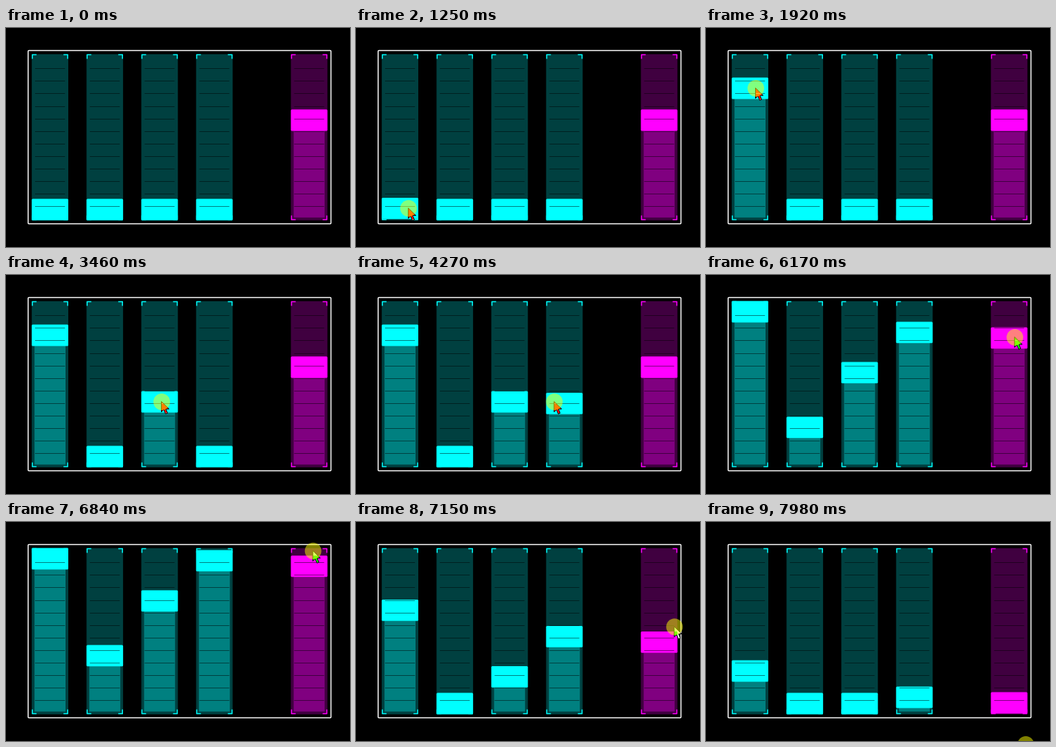
An HTML page with a canvas that plays this animation: 497x316 px, repeating every 8 s.

```html
<!DOCTYPE html>
<html lang="en">
<head>
<meta charset="utf-8">
<title>Linked sliders</title>
<style>
  html, body { margin: 0; width: 100%; height: 100%; overflow: hidden; background: #000; }
  canvas { display: block; width: 497px; height: 316px; }
</style>
</head>
<body>
<canvas id="stage" width="497" height="316"></canvas>
<script>
const ctx = document.getElementById('stage').getContext('2d');
const LOOP = 8000;
const TOP = 38, BOTTOM = 277, WIDTH = 52.8, THUMB = 30;
const MIN = TOP, MAX = BOTTOM - THUMB;
const MASTER_X = 411.6, MASTER_REST = 118;
const sliderX = i => 37.2 + 79.15 * i;

const CYAN = { track: '#004040', fill: '#008080', bright: '#00ffff' };
const MAGENTA = { track: '#400040', fill: '#800080', bright: '#ff00ff' };

const smooth = p => p * p * (3 - 2 * p);
const easeOut = power => p => 1 - (1 - p) ** power;
const lerp = (a, b, u) => a + (b - a) * u;
const limit = (v, low, high) => Math.min(high, Math.max(low, v));

// Pointer moves; "via" bends the path, "slider" and "master" mark drags
const MOVES = [
  { start: 190, end: 840, to: [76, 262], via: [240, 128] },
  { start: 1210, end: 1920, to: [72, 87], slider: 0, top: 72 },
  { start: 2120, end: 2920, to: [228, 253], via: [95, 275] },
  { start: 3090, end: 3460, to: [225, 183], slider: 2, top: 168 },
  { start: 3590, end: 3890, to: [281, 257] },
  { start: 3920, end: 4570, to: [291, 125], slider: 3, top: 110 },
  { start: 4740, end: 5480, to: [450, 132], via: [394, 254], ease: easeOut(2) },
  { start: 5800, end: 6640, to: [441, 30], master: -14 },
  { start: 6810, end: 7600, to: [462, 262], via: [468, 146], ease: easeOut(1.31), master: 7 },
  { start: 7630, end: 7840, to: [462, 321], ease: p => p, master: 7 }
];
MOVES.forEach((move, i) => { move.from = i ? MOVES[i - 1].to : [401, 330]; });

function progress(move, t) {
  const p = limit((t - move.start) / (move.end - move.start), 0, 1);
  return (move.ease || smooth)(p);
}

function position(move, t) {
  const u = progress(move, t);
  return move.from.map((a, axis) => {
    const b = move.to[axis];
    const c = move.via ? move.via[axis] : (a + b) / 2;
    return lerp(lerp(a, c, u), lerp(c, b, u), u);
  });
}

function sliderTop(i, t) {
  const move = MOVES.find(m => m.slider === i);
  return move ? lerp(MAX, move.top, progress(move, t)) : MAX;
}

function roundRect(x, y, w, h, color) {
  ctx.fillStyle = color;
  ctx.beginPath();
  ctx.roundRect(x, y, w, h, 1.5);
  ctx.fill();
}

function corner(x, y, dx, dy) {
  ctx.beginPath();
  ctx.moveTo(x, y + 6 * dy);
  ctx.lineTo(x, y);
  ctx.lineTo(x + 6 * dx, y);
  ctx.stroke();
}

function slider(x, top, colors) {
  const under = top + THUMB;
  roundRect(x, TOP - 0.3, WIDTH, BOTTOM - TOP + 0.8, colors.track);
  if (under < 273) {
    ctx.fillStyle = colors.fill;
    ctx.fillRect(x + 4, under, WIDTH - 8, 273.5 - under);
  }
  ctx.strokeStyle = colors.bright;
  ctx.lineWidth = 1.5;
  for (const [cx, dx] of [[x + 0.9, 1], [x + WIDTH - 0.9, -1]]) {
    corner(cx, TOP + 0.5, dx, 1);
    corner(cx, BOTTOM - 0.5, dx, -1);
  }
  roundRect(x, top - 0.4, WIDTH, THUMB + 0.8, colors.bright);
  ctx.fillStyle = 'rgba(0,0,0,.5)';
  for (let i = 0; i < 12; i++) {
    ctx.fillRect(x + 4.8, Math.round(58.22 + i * 18.1), WIDTH - 9.6, 1);
  }
}

const ARROW = new Path2D('M-.5 -.5V14.5L3 11.2L5.6 17.4L8.4 16.2L5.8 10.2H10.5Z');

// The arrow inverts what lies beneath it
function pointer([x, y], pressed) {
  ctx.save();
  ctx.translate(x, y);
  ctx.globalCompositeOperation = 'difference';
  ctx.fillStyle = '#fff';
  ctx.fill(ARROW);
  ctx.globalCompositeOperation = 'source-over';
  ctx.strokeStyle = '#000';
  ctx.lineWidth = 1;
  ctx.stroke(ARROW);
  if (pressed) {
    ctx.fillStyle = 'rgba(255,255,0,.5)';
    ctx.beginPath();
    ctx.arc(0, 0, 12, 0, Math.PI * 2);
    ctx.fill();
  }
  ctx.restore();
}

function draw(t) {
  const move = MOVES.findLast(m => t >= m.start) || MOVES[0];
  const tip = position(move, t);
  const master = 'master' in move ? limit(tip[1] + move.master, MIN, MAX - 1) : MASTER_REST;

  ctx.fillStyle = '#000';
  ctx.fillRect(0, 0, 497, 316);
  ctx.strokeStyle = '#fff';
  ctx.lineWidth = 1.5;
  ctx.beginPath();
  ctx.roundRect(32, 32.5, 437.5, 250, 1);
  ctx.stroke();

  for (let i = 0; i < 4; i++) {
    const top = sliderTop(i, t) + master - MASTER_REST;
    slider(sliderX(i), limit(top, MIN, MAX), CYAN);
  }
  slider(MASTER_X, master, MAGENTA);
  pointer(tip, 'slider' in move || 'master' in move);
}

const start = performance.now();
function frame() {
  draw((performance.now() - start) % LOOP);
  requestAnimationFrame(frame);
}
frame();
</script>
</body>
</html>
```
